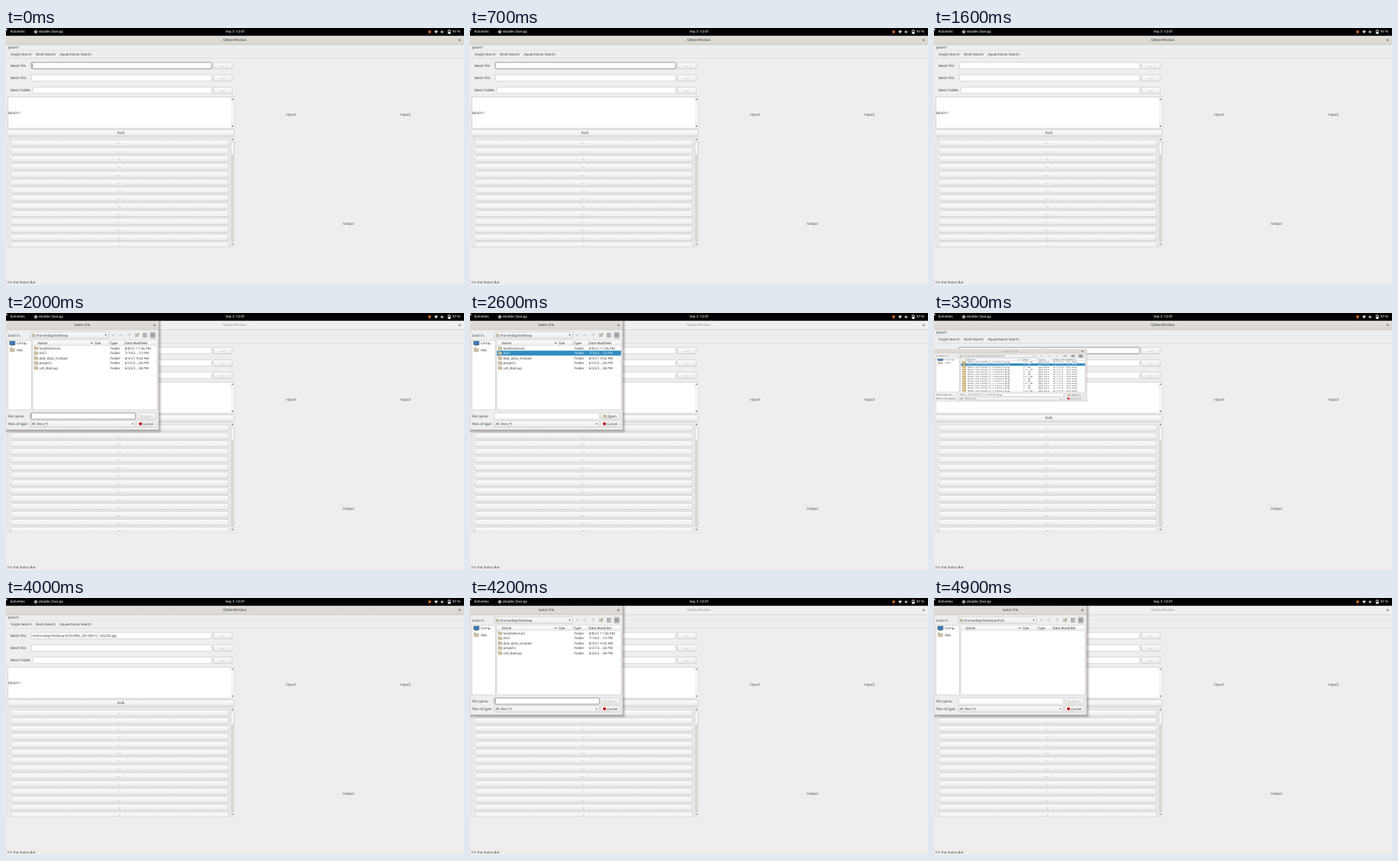
Recreate the animation shown at these times as an HTML page. Size 600 by 337 pixels, loop 5100 ms.

```html
<!DOCTYPE html>
<html lang="en">
<head>
<meta charset="utf-8">
<title>Select File</title>
<style>
html, body { margin: 0; width: 100%; height: 100%; overflow: hidden; background: #efeeee; }
svg { display: block; width: 100vw; height: 100vh; }
text { font: 4.48px "Open Sans", "Noto Sans", sans-serif; fill: #2e3436; text-rendering: geometricPrecision; white-space: pre; }
.mid { text-anchor: middle; }
.bold { font-weight: 600; font-size: 4.4px; }
.bar { fill: #e4e4e4; }
</style>
</head>
<body>
<svg id="stage" viewBox="0 0 600 337" preserveAspectRatio="none"></svg>
<script>
const LOOP = 5100;
const USER = 'dap', FOLDER = 'VUO', PHOTO = 'IMG_20190912_163230.jpg';
const DESKTOP = `/home/${USER}/Desktop`;
const stage = document.getElementById('stage');

const range = (n, fn) => Array.from({ length: n }, (_, i) => fn(i)).join('');
const rect = (x, y, w, h, fill, extra = '') =>
  `<rect x="${x}" y="${y}" width="${w}" height="${h}" fill="${fill}" ${extra}/>`;
const path = (d, fill, extra = '') => `<path d="${d}" fill="${fill}" ${extra}/>`;
const stroke = (d, color, w = 0.6, extra = '') =>
  path(d, 'none', `stroke="${color}" stroke-width="${w}" ${extra}`);
// y is the middle of the lower-case letters' line
const label = (x, y, s, cls = '', extra = '') =>
  `<text x="${x}" y="${y + 1.6}" class="${cls}" ${extra}>${s}</text>`;
const group = (id, body, extra = '') => `<g id="${id}" ${extra}>${body}</g>`;
const frame = (x, y, w, h, fill, line, id = '') =>
  rect(x, y, w, h, fill, `rx="1" stroke="${line}" stroke-width=".6" ${id && `id="${id}"`}`);
const button = (x, y, w, h, s = '', id = '') =>
  frame(x, y, w, h, 'url(#face)', '#bfbcb9', id) +
  (s && label(x + w / 2, y + h / 2, s, 'mid'));
const field = (x, y, w, h, id) => frame(x, y, w, h, '#fff', '#c4c1be', id);
const arrow = (x, y, dir = 1, color = '#444') =>
  path(`M${x - 1.3} ${y - 0.7 * dir}h2.6l-1.3 ${1.6 * dir}z`, color);
const cross = (x, y) =>
  stroke(`M${x - 1.2} ${y - 1.2}l2.4 2.4m0 -2.4l-2.4 2.4`, '#3a3d3e', 0.7);
const folder = (x, y, s = 1) =>
  path(`M${x} ${y - 2.2 * s}h${2 * s}l${0.6 * s} ${0.8 * s}h${2.4 * s}v${3.6 * s}h${-5 * s}z`,
    '#cdbf9f', 'stroke="#99927f" stroke-width=".3"');

function defs() {
  const grad = (id, a, b) => `<linearGradient id="${id}" x1="0" y1="0" x2="0" y2="1">
    <stop offset="0" stop-color="${a}"/><stop offset="1" stop-color="${b}"/></linearGradient>`;
  return `<defs>${grad('face', '#fdfdfd', '#ebeaea')}${grad('title', '#e3dfdb', '#d9d5d0')}
    <clipPath id="rows">${rect(3, 143.5, 292, 143, '#000')}</clipPath>
    <clipPath id="files">${rect(35, 36, 163, 91, '#000')}</clipPath></defs>`;
}

function topBar() {
  const white = '#e4e4e4';
  return rect(0, 0, 600, 10.2, '#000') +
    path('M0 0v3.6l1 -1l1.4 .2z', '#ddd') +
    label(5.5, 4.8, 'Activities', 'bold bar') +
    path('M39 2.4l2.6 2.6l-2.6 2.6l-2.6 -2.6z', white) +
    rect(38.3, 4.3, 1.4, 1.4, '#000') +
    label(43, 4.8, 'double_face.py', 'bold bar') +
    label(300, 4.8, 'Sep 3  12:07', 'mid bold bar') +
    '<circle cx="555" cy="5" r="1.9" fill="#c96a24"/>' +
    path('M561.2 4.2q2.3 -2 4.6 0l-2.3 3z', white) +
    path('M569.6 4.2h1l1.4 -1.3v4.4l-1.4 -1.3h-1z', white) +
    stroke('M573 3.6q1.2 1.4 0 2.9', white, 0.5) +
    stroke('M579.2 3.2h3v4.2h-3zM580 2.5h1.4', white, 0.8) +
    rect(579.4, 5, 2.6, 2.3, white) +
    label(585, 4.8, '97 %', 'bold bar');
}

function mainWindow() {
  const rows = [['File', 49.3, 33.2], ['File', 65.5, 33.2], ['Folder', 81.6, 35.2]];
  return rect(0, 10, 600, 327, '#efeeee') +
    rect(0, 10.2, 600, 11.8, 'url(#title)', 'id="mainBar"') +
    label(299.6, 15.8, 'QMainWindow', 'mid', 'id="mainTitle"') + cross(594.3, 15.8) +
    rect(0, 21.7, 600, 0.6, '#c5c1bd') +
    label(2.7, 25.2, 'Search') + rect(2.8, 27.6, 2.3, 0.3, '#555') +
    rect(0, 29.2, 600, 0.5, '#dcdad9') + rect(0, 39.2, 600, 0.6, '#d5d3d2') +
    label(6, 34.4, 'Single Search') + label(39, 34.4, 'Multi-Search') +
    label(70.5, 34.4, 'Aquaintance Search') +
    rows.map(([s, y, x], i) =>
      label(5.4, y, 'Select ' + s) +
      field(x, y - 4.2, 269.4 - x, 8.4, 'field' + i) +
      button(271.6, y - 4.2, 24.6, 8.4, '...', 'pick' + i)).join('') +
    label(34, 49.2, `${DESKTOP}/${FOLDER}/${PHOTO}`, '', 'id="chosen"') +
    rect(34.3, 46.4, 0.5, 5.8, '#222', 'id="caret"') +
    rect(2.6, 90.6, 296.4, 41, '#fff', 'stroke="#c4c1be" stroke-width=".6"') +
    rect(294.6, 91, 4.2, 40.2, '#f5f4f4') + arrow(296.7, 93.3, -1) + arrow(296.7, 128.8) +
    label(3.1, 110.9, 'READY !') +
    button(2.2, 133.5, 296.6, 8.2, 'RUN') +
    rect(2.5, 143.3, 296.4, 143.6, '#efeeee', 'stroke="#cbc8c5" stroke-width=".6"') +
    group('list', range(14, i => button(6, 146.8 + 10.3 * i, 285.8, 8.1, '...')),
      'clip-path="url(#rows)"') +
    rect(294.4, 143.6, 4.3, 143, '#d9d7d5') + rect(294.6, 143.6, 4, 5.4, '#f3f2f2') +
    rect(294.6, 281, 4, 5.5, '#f3f2f2') + arrow(296.6, 146, -1) + arrow(296.6, 283.6) +
    frame(294.7, 149.2, 3.8, 17.2, '#fbfbfb', '#c8c5c2') +
    label(374, 113, 'Input1', 'mid') + label(523.5, 113, 'Input2', 'mid') +
    label(448.6, 256, 'Output', 'mid') +
    label(2, 333.2, "I'm the Status Bar");
}

const rowY = i => 46.1 + 6.47 * i;

function dirRows() {
  const dirs = [['faceDetection', '8/8/21 11:36 PM'], [FOLDER, '7/14/2...:15 PM'],
    ['obd_data_module', '8/3/21 9:42 AM'], ['projects', '6/27/2...:26 PM'],
    ['v20_Backup', '6/25/2...:38 PM']];
  return dirs.map(([name, date], i) => folder(37, rowY(i)) +
    label(43.4, rowY(i), name) + label(136.4, rowY(i), 'Folder') +
    label(155.8, rowY(i), date)).join('');
}

function photoRows() {
  return range(13, i => {
    const y = rowY(i);
    const name = i === 1 ? PHOTO : `IMG_20190912_${162207 + i * 1013}.jpg`;
    return rect(37.2, y - 2, 4.6, 4, '#d8b55d', 'stroke="#8d8468" stroke-width=".4"') +
      label(43.4, y, name) + label(116.6, y, (i % 3 ? '7' : '10') + '...iB') +
      label(136.4, y, 'jpg File') +
      label(155.8, y, `9/17/2...:${i < 5 ? '03' : '04'} AM`);
  });
}

function dialog() {
  const gray = '#c3c1c0';
  return group('shadow', range(5, i =>
      rect(-2, 10, 202 + i, 143.5 + i, '#000', 'rx="2" opacity=".07"'))) +
    rect(0, 10.2, 200, 143, '#efeeee', 'stroke="#aaa6a2" stroke-width=".6"') +
    rect(0, 10.2, 200, 11.8, 'url(#title)') + rect(0, 21.7, 200, 0.6, '#c5c1bd') +
    label(99.8, 15.8, 'Select File', 'mid', 'id="dialogTitle"') + cross(194.4, 15.8) +
    label(2.8, 29, 'Look in:') + button(32, 25, 102.4, 8.2) + folder(34, 29.2, 0.85) +
    label(39.2, 29, DESKTOP, '', 'id="where"') + arrow(130.6, 29) +
    stroke('M143 29h-4m1.7 -1.7l-1.7 1.7l1.7 1.7M148 29h4m-1.7 -1.7l1.7 1.7l-1.7 1.7M161.3 31v-4m-1.7 1.7l1.7 -1.7l1.7 1.7', gray, 0.8) +
    folder(169.3, 29.3, 0.8) + rect(172.2, 26.7, 1.5, 1.5, '#555') +
    stroke('M179.8 26.8h4.2v4.6h-4.2zM180.6 28.3h2.6m-2.6 1.5h2.6', '#555', 0.6) +
    frame(189, 25.4, 6.6, 7.4, '#dddad8', '#8f8b88') +
    stroke('M190.7 27h3.2v4.2h-3.2zM190.7 28.5h3.2m-3.2 1.4h3.2', '#444', 0.5) +
    rect(2.6, 36, 30.6, 91, '#fff', 'stroke="#c4c1be" stroke-width=".6"') +
    rect(4.8, 37, 7.2, 4.8, '#3a79b7', 'stroke="#344b60" stroke-width=".4"') +
    rect(6.6, 42.3, 3.6, 0.7, '#555') + label(14, 39.8, 'Comp...') +
    folder(5.2, 48.2, 1.2) + label(14, 48, USER) +
    rect(35, 36, 163, 91, '#fff', 'stroke="#c4c1be" stroke-width=".6"') +
    rect(35.3, 36.2, 162.4, 6.5, 'url(#face)') + rect(35.3, 42.6, 162.4, 0.4, '#d0cdca') +
    [115, 134.4, 154].map(x => rect(x, 36.4, 0.4, 6.2, '#d0cdca')).join('') +
    label(41.6, 39.2, 'Name') + arrow(112.2, 39.2, -1) + label(116.2, 39.2, 'Size') +
    label(135.8, 39.2, 'Type') + label(155.6, 39.2, 'Date Modified') +
    rect(35.4, rowY(1) - 3.2, 162.4, 6.4, '#2f8bc0', 'id="mark"') +
    group('dirs', dirRows(), 'clip-path="url(#files)"') +
    group('photos', photoRows(), 'clip-path="url(#files)"') +
    label(2.8, 135, 'File name:') + rect(12, 137.4, 2, 0.3, '#555') +
    field(32, 131, 137.4, 8.2, 'nameField') +
    rect(33.2, 132.3, 0.4, 5.6, '#222', 'id="nameCaret"') +
    label(33.4, 135, PHOTO, '', 'id="nameText"') +
    button(171.6, 131, 25, 8.2) +
    group('open', folder(174.8, 135.2, 0.9) + label(180.4, 135, 'Open') +
      rect(180.6, 137.4, 3, 0.3, '#555')) +
    label(2.8, 145.4, 'Files of type:') + button(32, 141.4, 137.4, 8.2) +
    label(33.4, 145.4, 'All Files (*)') + arrow(165.8, 145.4) +
    button(171.6, 141.4, 25, 8.2) + '<circle cx="176.2" cy="145.3" r="2.1" fill="#c4161c"/>' +
    label(179.4, 145.4, 'Cancel') + rect(179.6, 147.8, 2.6, 0.3, '#555');
}

stage.innerHTML = defs() + mainWindow() + group('dialog', dialog()) + topBar();

const el = {};
stage.querySelectorAll('[id]').forEach(n => { el[n.id] = n; });
const show = (id, on) => el[id].setAttribute('display', on ? 'inline' : 'none');
const set = (id, key, value) => el[id].setAttribute(key, value);
const tint = (id, color) => { el[id].style.fill = color; };
const focus = (id, on) => set(id, 'stroke', on ? '#55595b' : '#c4c1be');

function draw(t) {
  const within = (a, b) => t >= a && t < b;
  const second = t >= 4200;

  // main window
  const dim = within(1800, 3100) || second;
  set('mainBar', 'fill', dim ? '#f1f0ef' : 'url(#title)');
  tint('mainTitle', dim ? '#8d9091' : '#2e3436');
  const editing = t < 1500 || within(3300, 3700);
  focus('field0', editing);
  show('caret', t < 700 || within(1300, 1500) || within(3300, 3700));
  set('caret', 'x', t < 1500 ? 34.3 : 145.6);
  show('chosen', t >= 3300);
  set('pick0', 'fill', within(1500, 1600) ? '#d6d3d0' : 'url(#face)');
  set('pick1', 'fill', within(3800, 4000) ? '#d6d3d0' : within(3700, 3800) ? '#fff' : 'url(#face)');

  // file dialog, squeezed towards its middle as it closes
  const closing = within(3100, 3500);
  const scale = within(3300, 3500) ? 0.48 : 1;
  show('dialog', within(2000, 3500) || second);
  set('dialog', 'transform', `translate(0 ${81.6 * (1 - scale)}) scale(1 ${scale})`);
  show('shadow', !closing);
  tint('dialogTitle', closing ? '#85888a' : '#2e3436');

  const inside = within(2700, 3500) || t >= 4900;
  const picked = within(2900, 3500);
  const marked = within(2600, 2700) || picked || within(4600, 4900);
  el.where.textContent = inside ? `${DESKTOP}/${FOLDER}` : DESKTOP;
  show('dirs', !inside);
  show('photos', within(2700, 3500));
  show('mark', marked);
  for (const id of ['dirs', 'photos']) {
    el[id].querySelectorAll('text').forEach(n => {
      const onMark = Math.abs(n.getAttribute('y') - 1.6 - rowY(1)) < 1;
      n.style.fill = marked && onMark ? '#fff' : '#2e3436';
    });
  }
  const typing = within(2000, 2600) || within(4200, 4600);
  focus('nameField', typing);
  show('nameCaret', typing);
  show('nameText', picked);
  set('open', 'opacity', marked ? 1 : 0.3);
}

function tick(now) {
  draw(now % LOOP);
  requestAnimationFrame(tick);
}
draw(0);
requestAnimationFrame(tick);
</script>
</body>
</html>
```
